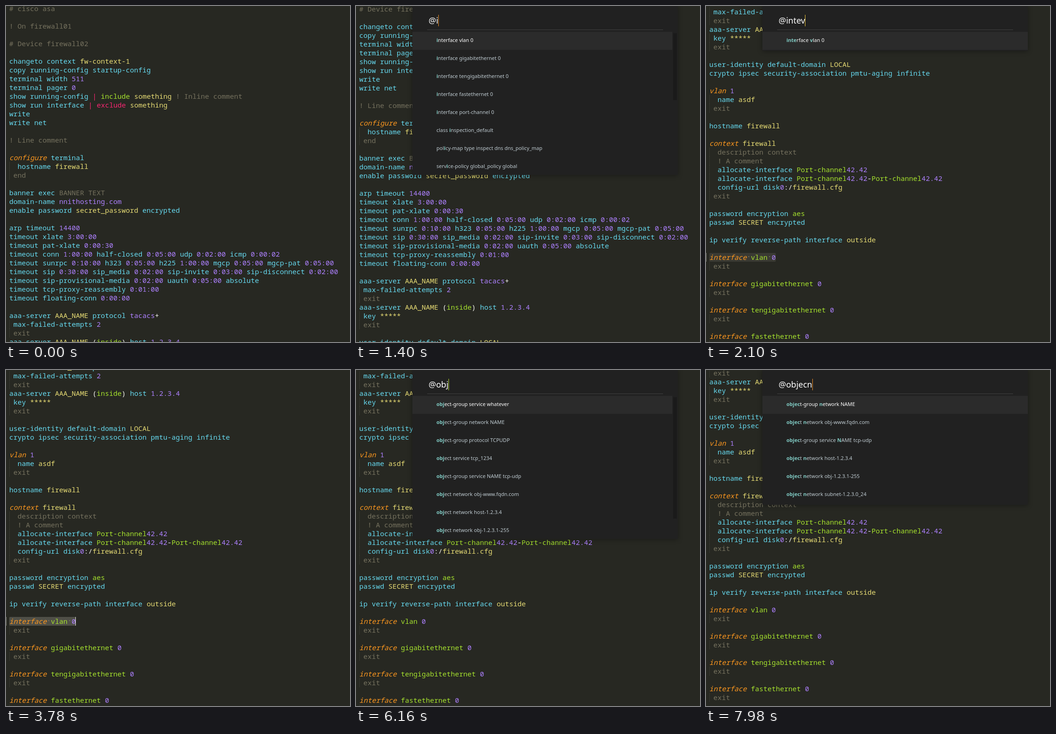
An HTML page for the animation above (8 s loop, 744x728 px).

```html
<!DOCTYPE html>
<html lang="en">
<head>
<meta charset="utf-8">
<title>Symbol search</title>
<style>
html, body { margin: 0; width: 100%; height: 100%; overflow: hidden; background: #272822; }
#stage { position: relative; width: 744px; height: 728px; overflow: hidden; }

#code { position: absolute; left: 7px; top: -4px; font: 15px/19px "Noto Sans Mono", monospace; color: #66d9ef; will-change: transform; }
.line { position: relative; height: 19px; width: max-content; white-space: pre; }
.line s { position: relative; text-decoration: none; }
.guide::after { content: ""; position: absolute; left: 0; top: 0; height: 19px; border-left: 1px dotted #46473f; }
.gray { color: #75715e; } .yellow { color: #e6db74; } .green { color: #a6e22e; }
.pink { color: #f92672; } .purple { color: #ae81ff; } .white { color: #f8f8f2; }
.orange { color: #fd971f; font-style: italic; }
.sel { background: #3a3a33; border-radius: 2px; }
.focus .sel { background: #4f4f47; }
.sel::before { content: ""; position: absolute; left: -7px; top: 0; width: 1px; height: 19px; background: #85857c; }
.sel s::after { content: "·"; position: absolute; left: 0; top: -1px; line-height: 19px; color: #85816e; font-style: normal; }
#cursor { position: absolute; left: 150px; top: 535px; width: 1px; height: 19px; background: #f8f8f0; }

#panel { position: absolute; left: 122px; top: 0; width: 574px; background: #212121; box-shadow: 0 1px 10px rgba(0, 0, 0, .35); font-family: "Noto Sans", sans-serif; }
#input { position: absolute; left: 35px; top: 19px; height: 25px; display: flex; font-size: 18px; line-height: 25px; color: #fff; white-space: pre; }
#caret { width: 1px; height: 25px; }
#rule { position: absolute; left: 32px; top: 51px; width: 510px; height: 1px; background: #424242; }
#list { position: absolute; left: 0; top: 56px; overflow: hidden; }
.row { height: 39px; padding-left: 52px; font-size: 11px; line-height: 36px; color: #c0ccd2; white-space: pre; }
.row.on { background: #2b2b2b; color: #fff; }
.row b { font-weight: 600; color: #80cbc4; }
#thumb { position: absolute; left: 564px; top: 59px; width: 8px; background: #1a1a1a; }
</style>
</head>
<body>
<div id="stage">
  <div id="code"></div>
  <div id="cursor"></div>
  <div id="panel">
    <div id="input"><span id="query"></span><div id="caret"></div></div>
    <div id="rule"></div>
    <div id="list"></div>
    <div id="thumb"></div>
  </div>
</div>
<script>
const $ = id => document.getElementById(id);

// A sigil colours the text after it; plain text is cyan, numbers are purple.
const SIGILS = { '~': 'orange', '$': 'yellow', '^': 'green', '%': 'pink', '@': 'purple', '&': 'white', ';': 'gray' };
const CODE = `# cisco asa

! On firewall01

# Device firewall02

changeto context $fw-context-1
copy running-config startup-config
terminal width 511
terminal pager 0
show running-config %| ^include $something ! Inline comment
show run interface %| %exclude $something
write
write net

! Line comment

~configure terminal
  hostname $firewall
 end

banner exec ;BANNER ;TEXT
domain-name @nnithosting.com
enable password $secret_password encrypted

arp timeout 14400
timeout xlate 3:00:00
timeout pat-xlate 0:00:30
timeout conn 1:00:00 half-closed 0:05:00 udp 0:02:00 icmp 0:00:02
timeout sunrpc 0:10:00 h323 0:05:00 h225 1:00:00 mgcp 0:05:00 mgcp-pat 0:05:00
timeout sip 0:30:00 sip_media 0:02:00 sip-invite 0:03:00 sip-disconnect 0:02:00
timeout sip-provisional-media 0:02:00 uauth 0:05:00 absolute
timeout tcp-proxy-reassembly 0:01:00
timeout floating-conn 0:00:00

aaa-server $AAA_NAME protocol @tacacs&+
 max-failed-attempts 2
 exit
aaa-server $AAA_NAME &(^inside&) host 1.2.3.4
 key $*****
 exit

user-identity default-domain $LOCAL
crypto ipsec security-association pmtu-aging infinite

~vlan 1
  name $asdf
 exit

hostname $firewall

~context $firewall
  description context
  ! A comment
  allocate-interface ^Port-channel@42.42
  allocate-interface ^Port-channel@42.42&-^Port-channel@42.42
  config-url disk@0&:/$firewall.cfg
 exit

password encryption ^aes
passwd $SECRET encrypted

ip verify reverse-path interface $outside

~interface ^vlan 0
 exit

~interface ^gigabitethernet 0
 exit

~interface ^tengigabitethernet 0
 exit

~interface ^fastethernet 0
 exit

~interface ^port-channel 0
 exit`;

const paint = (cls, text) => `<span class="${cls}">${text}</span>`;
const TOKEN = /(!.*)|([~$^%@&;])([^\s~$^%@&;]+)|(?<![\w.-])(\d[\d:.]*)| /g;
function highlight(line) {
  if (/^\s*([#!]|exit|end|description)/.test(line)) return paint('gray', line);
  return line.replace(TOKEN, (all, note, sigil, word, num) =>
    note ? paint('gray', note) : word ? paint(SIGILS[sigil], word) : num ? paint('purple', num) : '<s> </s>');
}
$('code').innerHTML = CODE.split('\n').map(l =>
  `<div class="line${l[0] === ' ' ? ' guide' : ''}">${highlight(l)}</div>`).join('');
const lines = $('code').children;

const LISTS = {
  all: ['changeto context fw-context-1', 'configure terminal', 'aaa-server AAA_NAME protocol tacacs',
    'aaa-server AAA_NAME (inside) host 1.2.3.4', 'vlan 1', 'context firewall', 'interface vlan 0', 'interface gigabitethernet 0'],
  inter: ['interface vlan 0', 'interface gigabitethernet 0', 'interface tengigabitethernet 0', 'interface fastethernet 0',
    'interface port-channel 0', 'class inspection_default', 'policy-map type inspect dns dns_policy_map', 'service-policy global_policy global'],
  vlan: ['interface vlan 0'],
  object: ['object-group service whatever', 'object-group network NAME', 'object-group protocol TCPUDP', 'object service tcp_1234',
    'object-group service NAME tcp-udp', 'object network obj-www.fqdn.com', 'object network host-1.2.3.4', 'object network obj-1.2.3.1-255'],
  network: ['object-group network NAME', 'object network obj-www.fqdn.com', 'object-group service NAME tcp-udp',
    'object network host-1.2.3.4', 'object network obj-1.2.3.1-255', 'object network subnet-1.2.3.0_24']
};
const THUMBS = { all: 88, inter: 145, object: 263 };
const CARETS = { '': '#c3d0c0', i: '#ff9a28', intev: '#f0c83c', obj: '#b4dc32', objecn: '#ff9a28' };

const LOOP = 8000, TICK = 70, VLAN = 64;
// time, query, list, chosen row, selected code line
const STEPS = [
  [0],
  [770, '', 'all', 0, 6],
  [1120, 'i', 'inter', 0, VLAN],
  [1470, 'in', 'inter', 0, VLAN],
  [1540, 'int', 'inter', 0, VLAN],
  [1680, 'inte', 'inter', 0, VLAN],
  [2030, 'intev', 'vlan', 0, VLAN],
  [2240, 'intevl', 'vlan', 0, VLAN],
  [2660, 'intevla', 'vlan', 0, VLAN],
  [3150, null, null, 0, VLAN],
  [5040, '', 'all', 6, VLAN],
  [5810, 'o', 'object', 0],
  [6020, 'ob', 'object', 0],
  [6160, 'obj', 'object', 0],
  [6300, 'obje', 'object', 0],
  [6370, 'objec', 'object', 0],
  [7700, 'objecn', 'network', 0]
];

// Marks the typed letters in the order they occur.
function mark(text, query) {
  let n = 0;
  return [...text].map(c => n < query.length && c.toLowerCase() === query[n] ? (n++, `<b>${c}</b>`) : c)
    .join('').replace(/<\/b><b>/g, '');
}

function show([, query, list, chosen, line]) {
  const open = !!list;
  $('panel').hidden = !open;
  $('code').classList.toggle('focus', !open);
  [...lines].forEach((el, i) => el.classList.toggle('sel', i === line));
  $('cursor').hidden = open || line !== VLAN;
  if (!open) return;
  const rows = LISTS[list], height = Math.min(rows.length * 39, 308), thumb = THUMBS[list] || 0;
  $('query').textContent = '@' + query;
  $('caret').style.background = CARETS[query] || '#f0c83c';
  $('list').innerHTML = rows.map((r, i) => `<div class="row${i === chosen ? ' on' : ''}">${mark(r, query)}</div>`).join('');
  $('list').style.height = height + 'px';
  $('list').style.width = (thumb ? 562 : 574) + 'px';
  $('panel').style.height = 58 + height + 'px';
  $('thumb').style.height = thumb + 'px';
}

function ease(t, start, span) {
  const p = Math.min(1, Math.max(0, (t - start) / span));
  return p < .5 ? 4 * p ** 3 : 1 - 4 * (1 - p) ** 3;
}
const scrollAt = t => Math.round(677 * ease(t, 1340, 198) + 225 * ease(t, 7920, 198));
// Solid for a moment after a key, then a soft pulse.
const blink = dt => dt < 200 ? 1 : .5 + .5 * Math.cos(2 * Math.PI * (dt - 200) / 950);

let current;
const begin = performance.now();
function frame() {
  // The screen refreshes in coarse ticks, like a recording.
  const t = Math.floor((performance.now() - begin) % LOOP / TICK) * TICK;
  const step = STEPS.findLast(s => s[0] <= t);
  if (step !== current) show(current = step);
  $('code').style.transform = `translateY(${-scrollAt(t)}px)`;
  $('caret').style.opacity = blink(t - step[0]);
  $('cursor').style.opacity = blink(t - 3500);
  requestAnimationFrame(frame);
}
frame();
</script>
</body>
</html>
```
